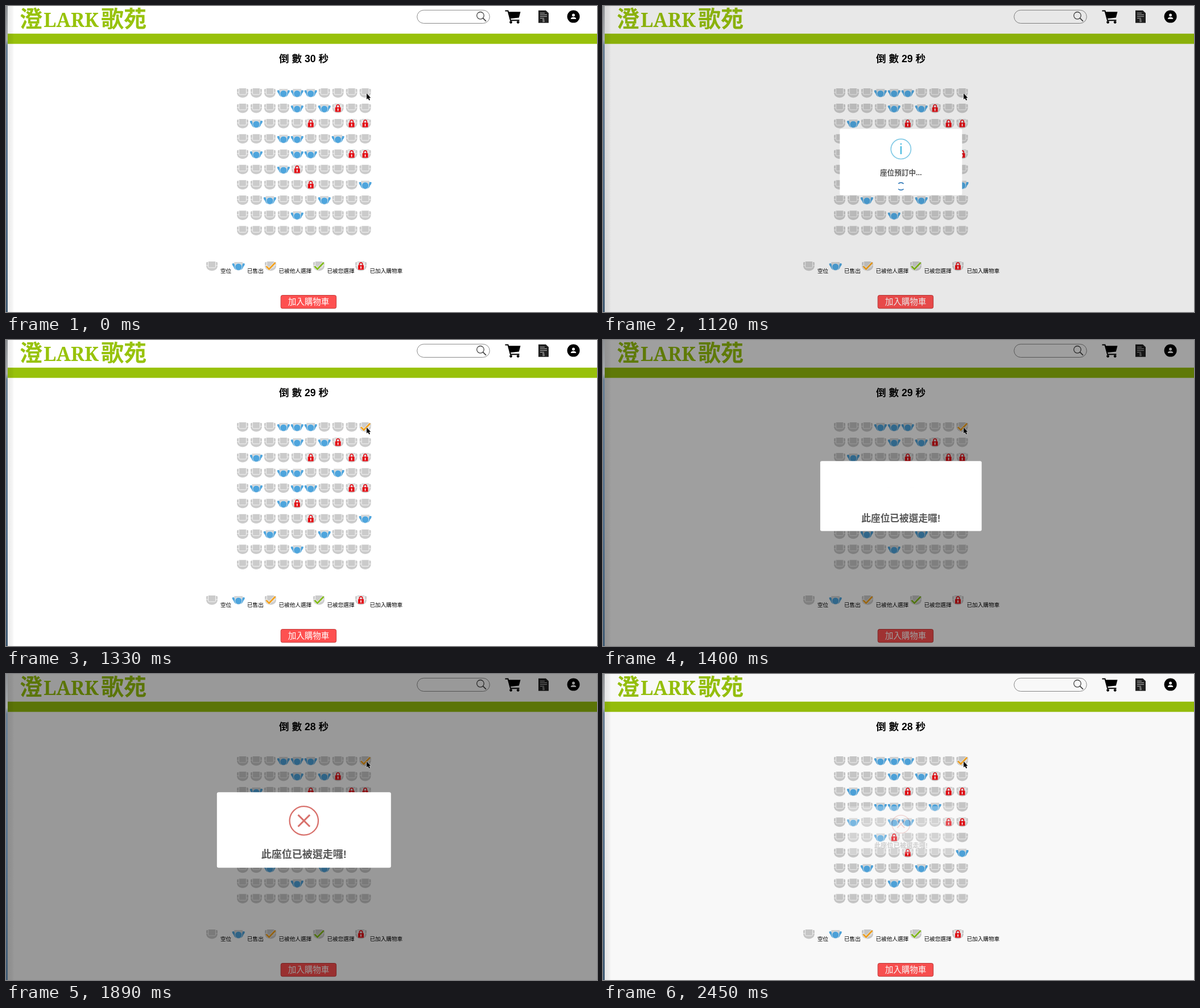
An HTML page that plays this animation: 1039 by 539 pixels, repeating every 2520 ms.

```html
<!DOCTYPE html>
<html lang="zh-Hant">
<head>
<meta charset="utf-8">
<title>選位</title>
<style>
html, body { margin: 0; width: 100%; height: 100%; overflow: hidden; background: #fff; }
svg { display: block; width: 1039px; height: 539px; }
text { font-family: "Liberation Sans", "Noto Sans CJK TC", "Noto Sans CJK", sans-serif; }
.mid { text-anchor: middle; }
.title { font-size: 18px; font-weight: 600; fill: #565656; text-anchor: middle; }
.legend { font-size: 9.65px; font-weight: 500; }
.brand { font-size: 40px; font-weight: 700; fill: #98c30c; }
.brand .latin { font-family: "Noto Serif", serif; font-size: 34px; }
</style>
</head>
<body>
<svg viewBox="0 0 1039 539">
  <defs>
    <linearGradient id="desk" x2="0" y2="1">
      <stop offset="0" stop-color="#8f9296"/><stop offset=".11" stop-color="#a9adb1"/>
      <stop offset=".13" stop-color="#6b8196"/><stop offset=".6" stop-color="#56718c"/>
      <stop offset="1" stop-color="#3f5a73"/>
    </linearGradient>
    <linearGradient id="shade">
      <stop offset="0" stop-color="#000" stop-opacity=".08"/>
      <stop offset=".75" stop-color="#000" stop-opacity=".04"/>
      <stop offset="1" stop-color="#000" stop-opacity="0"/>
    </linearGradient>

    <g id="seat">
      <path d="M-10-5.5Q-10-7-8.5-7H8.5Q10-7 10-5.5V-1C10 5 5.5 8.5 0 8.5S-10 5-10-1Z" fill="#cbcbcb"/>
      <path d="M-6.5-8H6.5V1Q6.5 3 4.5 3H-4.5Q-6.5 3-6.5 1Z" fill="#cbcbcb"/>
      <path d="M-6.5-8V1Q-6.5 3-4.5 3H4.5Q6.5 3 6.5 1V-8M-10-1H-6.5M6.5-1H10" fill="none" stroke="#f4f4f4"/>
    </g>
    <g id="sold">
      <path d="M-7.5-7H7.5L6.5 3H-6.5Z" fill="#d6d6d6"/>
      <path id="wing" d="M-11.3-4Q-9.5-5.2-7.4-4.6L-5.6 2.5L-3.5 7Q-7.4 5.6-8.5 1.5Q-10.8-.4-11.3-4Z" fill="#4ea5dd"/>
      <use href="#wing" transform="scale(-1 1)"/>
      <circle cy="1.6" r="6.2" fill="#4ea5dd" stroke="#dbe6ee" stroke-width=".9"/>
    </g>
    <g id="lock">
      <use href="#seat"/>
      <rect x="-6" y="-7" width="12" height="13.5" rx="2" fill="#e6e6e6"/>
      <path d="M-2.7-.8V-3.2A2.7 2.7 0 0 1 2.7-3.2V-.8" fill="none" stroke="#e30b13" stroke-width="1.6"/>
      <rect x="-5" y="-1.5" width="10" height="8" rx=".6" fill="#e30b13"/>
      <path d="M0 1.2V4" stroke="#fff" stroke-width="1.7" stroke-linecap="round"/>
    </g>
    <g id="tick">
      <use href="#seat"/>
      <path id="mark" d="M-7.5 .5L-2.5 5.5L8.5-6" fill="none" stroke="#eee" stroke-width="4.6"/>
      <path d="M-7.5 .5L-2.5 5.5L8.5-6" fill="none" stroke="currentColor" stroke-width="2.8"/>
    </g>
  </defs>

  <rect width="1039" height="539" fill="#fff"/>
  <rect y="48.7" width="1039" height="18" fill="#98c10b"/>
  <rect x="3" width="11" height="539" fill="url(#shade)"/>

  <text class="brand" x="24" y="37">澄<tspan class="latin" x="66">LARK</tspan><tspan x="167">歌苑</tspan></text>

  <rect x="722.7" y="7.3" width="127.6" height="23.2" rx="11.6" fill="none" stroke="#8a8a8a"/>
  <g fill="none" stroke="#444" stroke-width="1.3">
    <circle cx="834" cy="16.8" r="6.3"/><path d="M838.5 21.3L844 26.8" stroke-width="1.8"/>
  </g>
  <g>
    <path d="M877.5 8.6H882.5L887 25.3H902.5" fill="none" stroke="#000" stroke-width="2"/>
    <path d="M883 10.3H904.5L901.8 20.5L886.3 22.3Z"/>
    <circle cx="887.6" cy="28.6" r="2.4"/><circle cx="900.2" cy="28.6" r="2.4"/>
  </g>
  <path d="M936 7.8H949L954 12.5V29.8H936Z" fill="#222"/>
  <path d="M939 12.5H947M939 15.5H951M939 18.5H951M939 21.5H946" stroke="#bbb"/>
  <text class="mid" x="945" y="27.5" font-size="7" fill="#ddd">$</text>
  <circle cx="997.6" cy="18.6" r="11"/>
  <circle cx="997.6" cy="16" r="2.5" fill="#fff"/>
  <path d="M992.8 23Q993 19.4 997.6 19.4T1002.4 23Z" fill="#fff"/>

  <text id="count" class="mid" x="523.5" y="99" font-size="17.6" font-weight="700"></text>
  <g id="seats"></g>
  <g id="legend"></g>
  <rect x="483.2" y="509.5" width="97.4" height="23.2" rx="3" fill="#fe5050" stroke="#c23c3c"/>
  <text class="mid" x="532" y="526" font-size="14.5" fill="#fff">加入購物車</text>

  <rect id="dim" x="3" width="1036" height="539"/>

  <g id="loading">
    <rect x="-153" y="-83" width="306" height="166" rx="3" fill="#fff"/>
    <circle cy="-32.5" r="25" fill="none" stroke="#84cbe6" stroke-width="2.4"/>
    <text class="mid" y="-19.5" font-size="37" fill="#45b9e0">i</text>
    <text class="title" y="32.5">座位預訂中...</text>
    <path id="spinner" d="M-6.6-6.6A9.3 9.3 0 0 1 6.6-6.6M6.6 6.6A9.3 9.3 0 0 1-6.6 6.6" fill="none" stroke="#2f78b8" stroke-width="2.4"/>
  </g>

  <g id="taken">
    <rect x="-153" y="-66.5" width="306" height="133" rx="3" fill="#fff"/>
    <g id="badge" fill="none" stroke="#d8716c">
      <circle r="25.2" stroke-width="2.3"/>
      <path id="cross" d="M-10.3-10.3L10.3 10.3M10.3-10.3L-10.3 10.3" stroke-width="3"/>
    </g>
    <text class="title" y="49">此座位已被選走囉!</text>
  </g>

  <circle id="press" cx="634" cy="155" r="16" fill="none" stroke="#333" stroke-width="1.6"/>
  <path d="M634 154V164.6L636.4 162.4L638.2 166.3L640 165.5L638.3 161.7H641.3Z" stroke="#fff" stroke-width=".9" paint-order="stroke"/>
  <rect width="3" height="539" fill="url(#desk)"/>
</svg>

<script>
const LOOP = 2520, STEP = 70;
const CENTER = 'translate(523.8 274.8)';
const el = id => document.getElementById(id);
const clamp = v => Math.min(1, Math.max(0, v));
const mix = (a, b, p) => a + (b - a) * p;
const set = (id, attrs) => {
  for (const key in attrs) el(id).setAttribute(key, attrs[key]);
};

const icon = (name, x, y, extra = '') =>
  `<use href="#${name}" transform="translate(${x} ${y})" ${extra}/>`;
const ORANGE = 'color="#f2a11f"', GREEN = 'color="#82ba1c"';

// s = sold, l = in a cart, . = free
const rows = [
  '...sss....', '....s.sl..', '.s...l..ll', '...ss..s..', '.s..ss..ll',
  '...sl.....', '.....l...s', '..s...s...', '....s.....', '..........'
];
const kinds = { s: 'sold', l: 'lock', '.': 'seat' };
el('seats').innerHTML = rows.map((row, r) =>
  [...row].map((k, c) => icon(kinds[k], 416 + 23.95 * c, 153 + 26.95 * r)).join('')
).join('') + `<g id="picked">${icon('tick', 631.5, 153, ORANGE)}</g>`;

el('legend').innerHTML = [
  ['seat', 362, 377, '空位'], ['sold', 408.7, 424, '已售出'],
  ['tick', 465, 479.5, '已被他人選擇', ORANGE], ['tick', 550, 564.5, '已被您選擇', GREEN],
  ['lock', 624, 639.5, '已加入購物車']
].map(([name, x, textX, label, extra]) =>
  icon(name, x, 458, extra) + `<text class="legend" x="${textX}" y="470">${label}</text>`
).join('');

// CSS "ease": cubic-bezier(.25, .1, .25, 1)
function ease(x) {
  x = clamp(x);
  let lo = 0, hi = 1;
  const bez = (a, b, s) => 3 * a * s * (1 - s) ** 2 + 3 * b * s * s * (1 - s) + s ** 3;
  for (let i = 0; i < 24; i++) {
    const s = (lo + hi) / 2;
    if (bez(.25, .25, s) < x) lo = s; else hi = s;
  }
  return bez(.1, 1, lo);
}

// Keyframes as [time, value], eased within each segment
function track(t, keys) {
  for (let i = 1; i < keys.length; i++) {
    const [t0, a] = keys[i - 1], [t1, b] = keys[i];
    if (t < t1) return mix(a, b, ease((t - t0) / (t1 - t0)));
  }
  return keys[keys.length - 1][1];
}

const popScale = t => track(t, [[0, .7], [135, 1.05], [240, .95], [300, 1]]);
const show = (id, on) => set(id, { visibility: on ? 'visible' : 'hidden' });

const LOAD = 1118, SWAP = 1330, TAKEN = 1349, HIDE = 2374;

function draw(t) {
  el('count').textContent = `倒 數 ${t < 840 ? 30 : t < 1820 ? 29 : 28} 秒`;
  show('press', t >= 910 && t < 1050);
  show('picked', t >= SWAP);

  const dimStart = t < SWAP ? LOAD - 15 : SWAP;
  const dim = .4 * ease((t - dimStart) / 100) * (1 - ease((t - HIDE) / 112));
  set('dim', { opacity: dim });

  show('loading', t >= LOAD && t < SWAP);
  set('loading', { transform: `${CENTER} scale(${popScale(t - LOAD)})` });
  set('spinner', { transform: `translate(0 61) rotate(${(t - LOAD) * .24})` });

  const age = t - TAKEN, gone = ease((t - HIDE) / 170);
  show('taken', age >= 0);
  set('taken', {
    transform: `${CENTER} scale(${popScale(age) * mix(1, .5, gone)})`,
    opacity: 1 - gone
  });

  const turn = ease(age / 500);
  const tilt = Math.cos(mix(100, 0, turn) * Math.PI / 180);
  set('badge', { transform: `translate(0 -16.4) scale(1 ${tilt})`, opacity: turn });
  const size = track(age, [[0, .4], [250, .4], [400, 1.15], [500, 1]]);
  const drop = track(age, [[0, 17], [250, 17], [400, -4], [500, 0]]);
  set('cross', {
    transform: `translate(0 ${drop}) scale(${size})`,
    opacity: ease((age - 250) / 250)
  });
}

const start = performance.now();
function tick() {
  const t = (performance.now() - start) % LOOP;
  draw(Math.floor(t / STEP) * STEP);
  requestAnimationFrame(tick);
}
tick();
</script>
</body>
</html>
```
